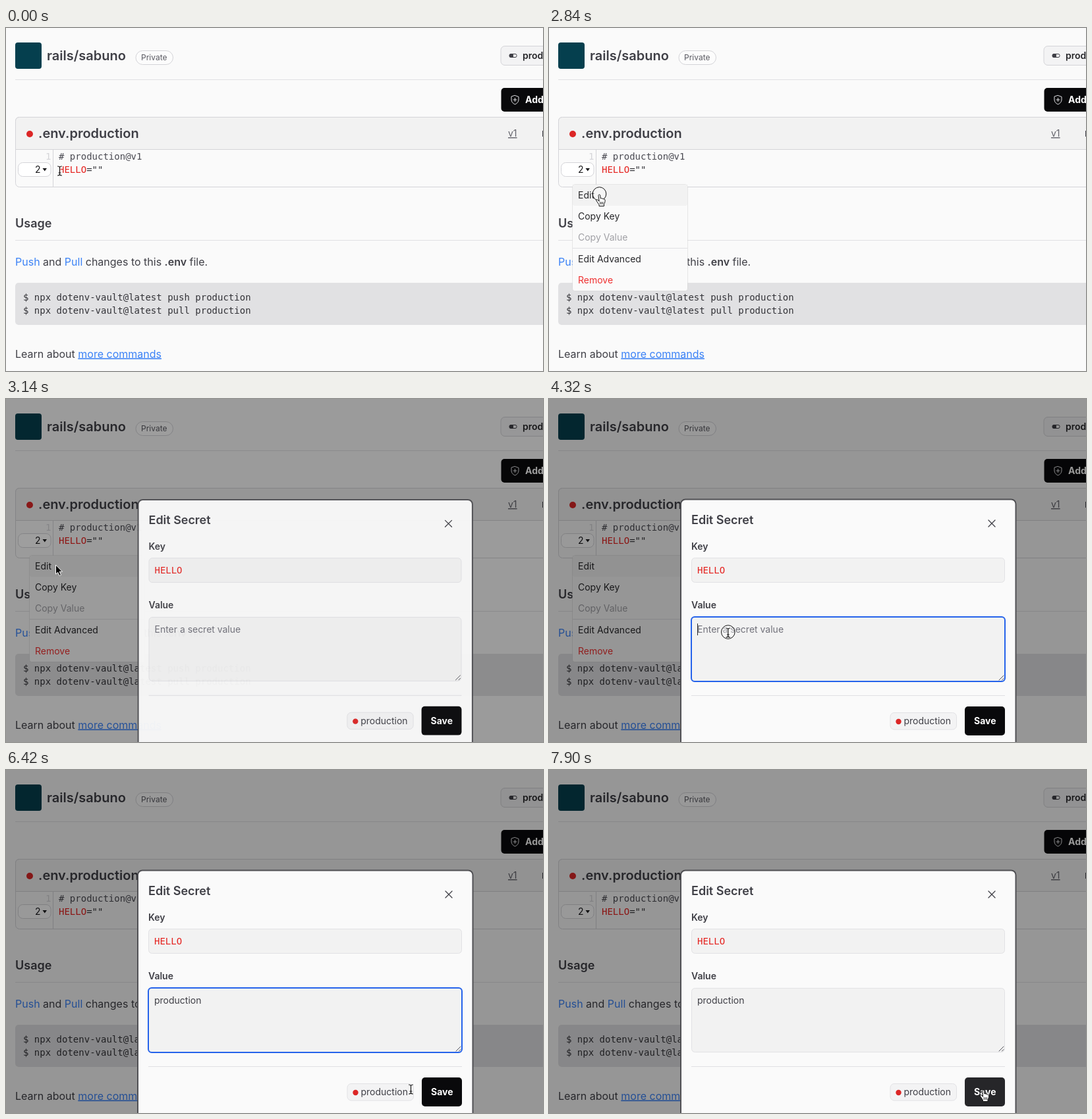
These frames come from a looping animation (815 px wide and 521 px high, 8 s). An HTML page:

```html
<!DOCTYPE html>
<html lang="en">
<head>
<meta charset="utf-8">
<title>Edit secret</title>
<style>
html, body { margin: 0; width: 100%; height: 100%; overflow: hidden; background: #fafafa; }
svg { display: block; width: 815px; height: 521px; }
text { font: 14px Inter, sans-serif; fill: #3f3f46; white-space: pre; }
.s12 { font-size: 12px; }
.s16 { font-size: 16px; }
.s18 { font-size: 18px; }
.s20 { font-size: 20px; }
.b { font-weight: 600; }
.bb { font-weight: 700; }
.mono { font-family: "DejaVu Sans Mono", monospace; fill: #333338; }
.link { fill: #3b82f6; }
.u { text-decoration: underline; text-underline-offset: 2px; }
.red { fill: #dc2626; }
.key { fill: #e5221f; }
.white { fill: #fff; }
.item { fill: #27272a; }
.line { fill: none; stroke: #e0e0e3; }
.edge { stroke: #d4d4d8; }
.field { fill: #f2f2f2; stroke: #e2e2e5; }
.icon { fill: none; stroke-linecap: round; stroke-linejoin: round; }
</style>
</head>
<body>
<svg viewBox="0 0 815 521">
  <rect width="815" height="521" fill="#fafafa"/>

  <!-- header -->
  <rect x="14" y="22" width="40" height="40" rx="4" fill="#053f4e"/>
  <text class="s20 b" x="62" y="49">rails/sabuno</text>
  <rect class="edge" x="197" y="34.5" width="56.5" height="21" rx="10.5" fill="#fcfcfc"/>
  <text class="s12" x="205" y="49" style="fill:#5a5a62">Private</text>
  <rect class="edge" x="751" y="27.5" width="90" height="29" rx="6" fill="#f3f3f4"/>
  <rect x="764" y="39.5" width="11" height="5" rx="2" fill="none" stroke="#3f3f46"/>
  <rect x="764" y="39.5" width="6" height="5" rx="1.5" fill="#3f3f46"/>
  <text class="b" x="784" y="47" style="fill:#27272a">prod</text>
  <path class="line" d="M14 78.5H815M14 322.5H815"/>
  <rect x="751.5" y="91" width="90" height="36" rx="5" fill="#09090b"/>
  <path class="icon" d="M772.5 102.5L778 104.5V109C778 112.5 775.5 114.5 772.5 116C769.5 114.5 767 112.5 767 109V104.5ZM772.5 106.5V111.5M770 109H775" stroke="#e4e4e7"/>
  <text class="bb white" x="788" y="114">Add</text>

  <!-- file card -->
  <rect class="edge" x="14.5" y="135.5" width="830" height="106" rx="6" fill="#fafafa"/>
  <path class="edge" d="M14.5 184.5V141.5Q14.5 135.5 20.5 135.5H830V184.5Z" fill="#f2f2f2"/>
  <circle class="red" cx="36" cy="161" r="5"/>
  <text class="s20 b" x="49" y="167">.env.production</text>
  <text class="u" x="762" y="165" style="fill:#62626a">v1</text>
  <rect x="814" y="156" width="1" height="9" fill="#3f3f46"/>
  <path class="edge" d="M71.5 184V241"/>
  <text x="60" y="200" class="mono" style="fill:#d4d4d8">1</text>
  <rect class="edge" x="18.5" y="204.5" width="49.5" height="21" rx="7" fill="#fff"/>
  <text x="44" y="220" style="fill:#18181b">2</text>
  <path d="M55.5 213H62L58.75 217.5Z" fill="#18181b"/>
  <text class="mono" x="80" y="200" style="fill:#4a4a52">#  production@v1</text>
  <text class="mono" x="80" y="219.5"><tspan class="key">HELLO</tspan>=""</text>

  <!-- usage -->
  <text class="s18 b" x="14" y="302.5">Usage</text>
  <text class="s16" x="14" y="360.5"><tspan class="link">Push</tspan> and <tspan class="link">Pull</tspan> changes to this <tspan class="b">.env</tspan> file.</text>
  <rect x="14" y="387" width="830" height="64" rx="5" fill="#e1e1e3"/>
  <text class="mono" x="26" y="413.5">$ npx dotenv-vault@latest push production</text>
  <text class="mono" x="26" y="433.5">$ npx dotenv-vault@latest pull production</text>
  <text class="s16" x="14" y="500.5">Learn about <tspan class="link u">more commands</tspan></text>

  <g id="menu">
    <rect x="35.5" y="237.5" width="175" height="162" rx="4" fill="#fafafa" stroke="#000" stroke-opacity=".08"/>
    <rect x="36" y="238" width="174" height="32" rx="3" fill="#f2f2f2"/>
    <path class="line" d="M36 334.5H210"/>
    <text class="item" x="44" y="259">Edit</text>
    <text class="item" x="44" y="291">Copy Key</text>
    <text x="44" y="323" style="fill:#a1a1a6">Copy Value</text>
    <text class="item" x="44" y="356">Edit Advanced</text>
    <text x="44" y="388" style="fill:#ef3030">Remove</text>
  </g>

  <rect id="shade" width="815" height="521"/>

  <g id="modal">
    <rect x="200" y="152.5" width="508.5" height="390" rx="7" fill="#fafafa" stroke="#505054" stroke-width="2"/>
    <text class="s18 b" x="216" y="189.5">Edit Secret</text>
    <path class="icon" d="M667 184L677 194M677 184L667 194" stroke="#3f3f46" stroke-width="1.3"/>
    <text class="b" x="216" y="228.5">Key</text>
    <rect class="field" x="216.5" y="241.5" width="475" height="37" rx="5"/>
    <text class="mono" x="225" y="264.5"><tspan class="key">HELLO</tspan></text>
    <text class="b" x="216" y="318">Value</text>
    <rect class="field" x="216.5" y="331.5" width="475" height="97" rx="5"/>
    <rect id="focus" x="216" y="331" width="476" height="98" rx="5" fill="none" stroke="#2563eb" stroke-width="2"/>
    <path class="icon" d="M683 427L690 420M687.5 427L690 424.5" stroke="#55555c"/>
    <text id="hint" x="225" y="355" style="fill:#71717a">Enter a secret value</text>
    <text id="value" x="225" y="355"></text>
    <rect id="caret" y="341" width="1" height="18" fill="#27272a"/>
    <path class="line" d="M216 450.5H692"/>
    <rect class="edge" x="518" y="476.5" width="100.5" height="25.5" rx="6" fill="#f3f3f4" style="stroke:#e2e2e5"/>
    <circle class="red" cx="530.5" cy="490" r="4.2"/>
    <text x="538.5" y="494">production</text>
    <rect id="save" x="631" y="467" width="61" height="44" rx="5"/>
    <text class="bb white" x="645" y="494">Save</text>
  </g>

  <g id="pointer">
    <circle id="ring" cy="-1" r="10.3" fill="#fff" fill-opacity=".35" stroke="#111"/>
    <g id="beam" class="icon">
      <path id="stem" d="M-3-7Q-.5-7 0-5.5Q.5-7 3-7M0-5.5V5.5M-3 7Q-.5 7 0 5.5Q.5 7 3 7M-1.5 3H1.5" stroke="#fff" stroke-width="2.6" stroke-opacity=".7"/>
      <use href="#stem" style="display:none"/>
      <path d="M-3-7Q-.5-7 0-5.5Q.5-7 3-7M0-5.5V5.5M-3 7Q-.5 7 0 5.5Q.5 7 3 7M-1.5 3H1.5" stroke="#111" stroke-width="1.2"/>
    </g>
    <path id="arrow" d="M-1-1V13L2.2 10.2L4.6 15.5L7 14.4L4.7 9.2H9Z" fill="#000" stroke="#fff" stroke-width="1"/>
    <g id="hand" stroke="#111" stroke-linejoin="round" stroke-linecap="round">
      <path d="M-1.5 1.2C-1.5-.4 1-.4 1.2 1.2L1.8 6C2.6 5.2 4 5.4 4.2 6.5C5 5.8 6.3 6.1 6.6 7.2C7.6 6.7 8.6 7.3 8.6 8.6C8.7 11 8 13 7 14.5V17.5H-.5V15.5C-2 13-3.5 11-4.8 9C-5 7.6-3.4 7.2-2.4 8.3L-.6 10Z" fill="#fff"/>
      <path d="M1.2 11.5V14.5M3.3 11.5V14.5M5.4 11.5V14.5" fill="none" stroke-width=".9"/>
    </g>
  </g>
</svg>
<script>
const LOOP = 8000;
const el = Object.fromEntries([...document.querySelectorAll("[id]")].map(e => [e.id, e]));
document.querySelectorAll(".mono").forEach(e => {
  if (e.textContent.startsWith("#")) e.textContent = "# production@v1";
});
el.beam.querySelector("use").remove();

// The screen only refreshes at these times.
const TICKS = [0, 150, 300, 440, 1490, 1640, 2240, 2390, 2540, 2840, 2990, 3140, 3290,
  3580, 3730, 3880, 4030, 4320, 4470, 4770, 5070, 5220, 5370, 5520, 5670, 5820,
  6120, 6270, 6420, 6560, 6860, 7010, 7150, 7900];

// Pointer stops: time, x, y
const PATH = [[0, 81.5, 217], [440, 59, 218], [2090, 59, 218], [2540, 76.5, 253],
  [3430, 76.5, 253], [4030, 271.8, 355], [5970, 271.8, 355], [6420, 614.5, 485], [6560, 659, 486]];
const CLICKS = [1490, 2840, 4320, 6860];
const WORD = "production";

const clamp = v => Math.min(1, Math.max(0, v));
const glide = p => (1 - Math.cos(Math.PI * p)) / 2;
const easeOut = p => 1 - (1 - p) ** 3;
const within = (t, a, b) => t >= a && t < b;
const show = (e, on) => { e.style.display = on ? "" : "none"; };

function pointerAt(t) {
  const i = PATH.findLastIndex(k => k[0] <= t);
  const a = PATH[i], b = PATH[i + 1] || a;
  const p = a === b ? 0 : glide((t - a[0]) / (b[0] - a[0]));
  return [a[1] + (b[1] - a[1]) * p, a[2] + (b[2] - a[2]) * p];
}

function pointerKind(t) {
  if (t < 300) return "beam";
  if (t < 2990) return "hand";
  if (t < 3880) return "arrow";
  return t < 6560 ? "beam" : "hand";
}

function saveColor(t) {
  if (t < 6560) return "#09090b";
  return within(t, 7150, 7900) ? "#1f1f22" : "#262629";
}

function draw(t) {
  show(el.menu, within(t, 1640, 4470));

  const open = easeOut(clamp((t - 2915) / 350));
  el.shade.setAttribute("opacity", 0.4 * open);
  show(el.modal, open > 0);
  el.modal.setAttribute("opacity", open);
  const s = 0.95 + 0.05 * open;
  el.modal.setAttribute("transform", `translate(454 338) scale(${s}) translate(-454 -338)`);

  const typed = Math.ceil(clamp((t - 4920) / 900) * WORD.length);
  el.value.textContent = WORD.slice(0, typed);
  show(el.hint, typed === 0);
  show(el.focus, within(t, 4320, 6860));
  show(el.caret, within(t, 4320, 4770) || within(t, 5070, 6120));
  el.caret.setAttribute("x", 225 + (typed ? el.value.getComputedTextLength() : 0));
  el.save.setAttribute("fill", saveColor(t));

  const [x, y] = pointerAt(t), kind = pointerKind(t);
  el.pointer.setAttribute("transform", `translate(${x} ${y})`);
  for (const k of ["beam", "arrow", "hand"]) show(el[k], k === kind);
  show(el.ring, CLICKS.includes(t));
}

let last = -1;
function frame() {
  const now = performance.now() % LOOP;
  const t = TICKS.findLast(k => k <= now);
  if (t !== last) draw(last = t);
  requestAnimationFrame(frame);
}
frame();
</script>
</body>
</html>
```
